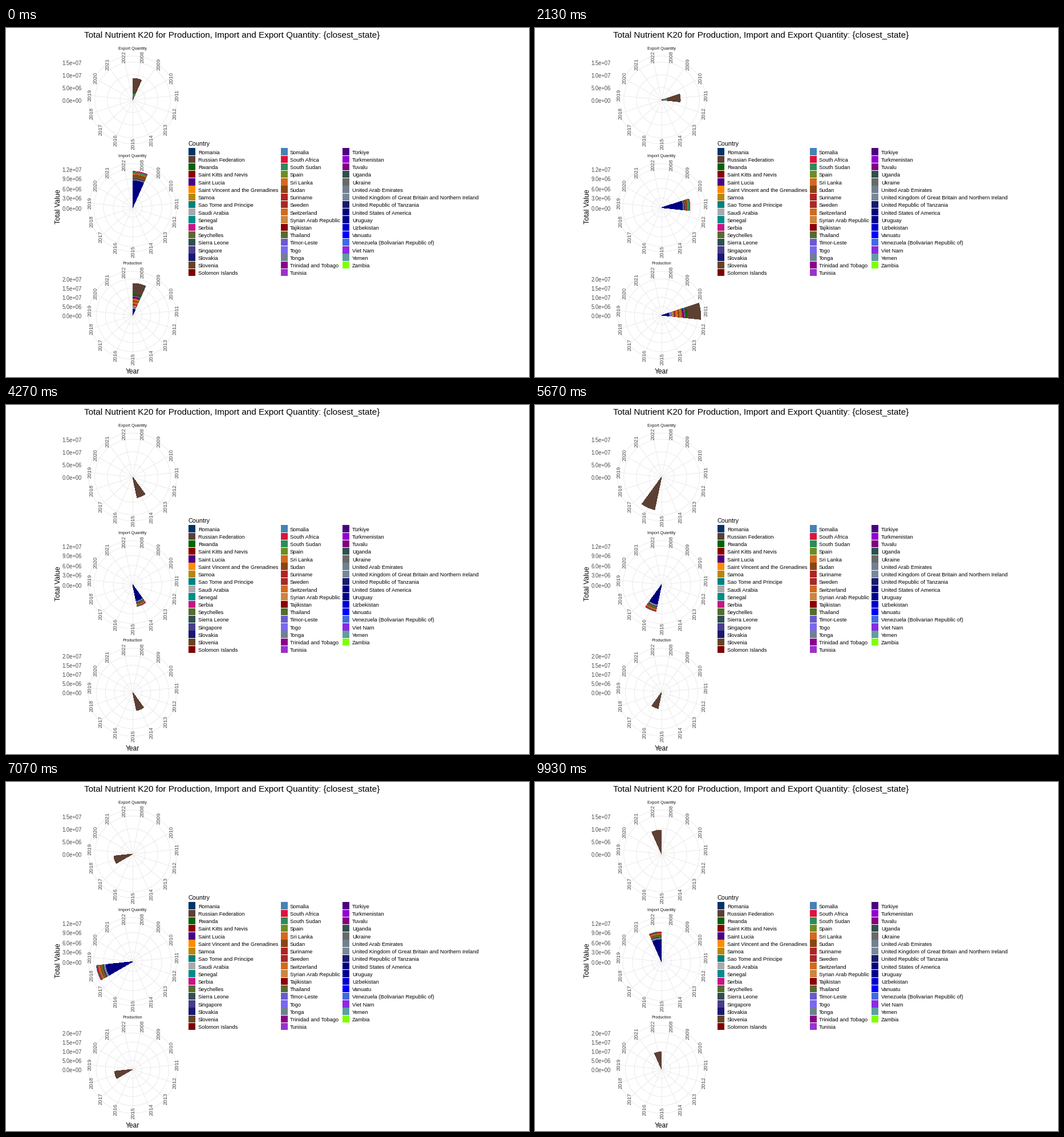
A matplotlib script that plays this animation: 917x611 px, repeating every 10000 ms.

```python
import matplotlib.pyplot as plt
import numpy as np
from matplotlib.animation import FuncAnimation
from matplotlib.patches import Circle, Rectangle, Wedge

W, H, DPI = 917, 611, 72  # at 72 dpi one point is one pixel
FRAMES, INTERVAL = 200, 50
TICKS = 150  # the years are spread evenly over this many ticks per loop
CX, RING = 222, 77
YEARS = range(2008, 2023)
STEP = 360 / len(YEARS)
GRID, GREY = "#ebebeb", "#4d4d4d"

plt.rcParams["font.family"] = "Liberation Sans"

COUNTRIES = {
    "Romania": "#003366", "Russian Federation": "#5c4033",
    "Rwanda": "#006400", "Saint Kitts and Nevis": "#8b0000",
    "Saint Lucia": "#4b0082", "Saint Vincent and the Grenadines": "#ff8c00",
    "Samoa": "#b8860b", "Sao Tome and Principe": "#008080",
    "Saudi Arabia": "#a9a9a9", "Senegal": "#008b8b", "Serbia": "#c71585",
    "Seychelles": "#556b2f", "Sierra Leone": "#2f4f4f",
    "Singapore": "#483d8b", "Slovakia": "#191970", "Slovenia": "#654321",
    "Solomon Islands": "#800000",
    "Somalia": "#4682b4", "South Africa": "#dc143c",
    "South Sudan": "#2e8b57", "Spain": "#6b8e23", "Sri Lanka": "#d2691e",
    "Sudan": "#8b4513", "Suriname": "#b22222", "Sweden": "#a52a2a",
    "Switzerland": "#d2691e", "Syrian Arab Republic": "#cd853f",
    "Tajikistan": "#8b0000", "Thailand": "#556b2f",
    "Timor-Leste": "#6a5acd", "Togo": "#7b68ee", "Tonga": "#708090",
    "Trinidad and Tobago": "#8b008b", "Tunisia": "#9932cc",
    "Türkiye": "#4b0082", "Turkmenistan": "#9400d3", "Tuvalu": "#800080",
    "Uganda": "#2f4f4f", "Ukraine": "#696969",
    "United Arab Emirates": "#708090",
    "United Kingdom of Great Britain and Northern Ireland": "#778899",
    "United Republic of Tanzania": "#191970",
    "United States of America": "#000080", "Uruguay": "#00008b",
    "Uzbekistan": "#0000cd", "Vanuatu": "#0000ff",
    "Venezuela (Bolivarian Republic of)": "#4169e1",
    "Viet Nam": "#8a2be2", "Yemen": "#5f9ea0", "Zambia": "#7fff00",
}
USA = "United States of America"
UK = "United Kingdom of Great Britain and Northern Ireland"
RUSSIA = {"Russian Federation": 1}

# Shares of each stack, from the centre outwards
EXPORT_MIX = {USA: 6, "Sweden": 4, "South Africa": 4, "Spain": 4,
              "South Sudan": 10, "Russian Federation": 72}
IMPORT_EARLY = {USA: 74, UK: 2, "Ukraine": 1.5, "Türkiye": 1.5,
                "Thailand": 3, "Sudan": 8, "Sri Lanka": 2,
                "South Sudan": 5, "South Africa": 1.5, "Serbia": 1.5}
IMPORT_LATE = {USA: 73.5, UK: 4, "Ukraine": 2, "Türkiye": 1.5,
               "Thailand": 5, "Sudan": 3, "Sri Lanka": 2, "Spain": 2.5,
               "South Africa": 3.5, "Slovenia": 1.5, "Somalia": 1.5}
PRODUCTION_MIX = {USA: 19, UK: 3, "Togo": 3, "Tonga": 2,
                  "Syrian Arab Republic": 3, "Sweden": 5, "Switzerland": 6,
                  "Sudan": 4, "Sri Lanka": 4, "Spain": 2,
                  "South Africa": 2, "Slovakia": 3, "Senegal": 2,
                  "Serbia": 2, "Rwanda": 5, "Russian Federation": 35}

# title, centre y, pixels per break, break labels, early and late mix, radii
PANELS = [
    ("Export Quantity", 126, 22.1,
     ["0.0e+00", "5.0e+06", "1.0e+07", "1.5e+07"], EXPORT_MIX, RUSSIA,
     [38, 23, 38, 33, 33, 34, 37, 53, 58.5, 68.4, 33, 33, 34.7, 43.8, 42]),
    ("Import Quantity", 314.5, 17,
     ["0.0e+00", "3.0e+06", "6.0e+06", "9.0e+06", "1.2e+07"],
     IMPORT_EARLY, IMPORT_LATE,
     [63.7, 34, 56, 50, 45, 50, 39, 50, 48, 54, 64, 59, 60.5, 68.4, 52.5]),
    ("Production", 503, 15.9,
     ["0.0e+00", "5.0e+06", "1.0e+07", "1.5e+07", "2.0e+07"],
     PRODUCTION_MIX, RUSSIA,
     [56, 35, 60.5, 68.4, 60.5, 36, 32.7, 31, 29, 34, 32, 33, 36.5, 36, 30.5]),
]

fig = plt.figure(figsize=(W / DPI, H / DPI), dpi=DPI, facecolor="white")
ax = fig.add_axes([0, 0, 1, 1])
ax.set(xlim=(0, W), ylim=(H, 0))
ax.axis("off")
bars = [[] for _ in YEARS]


def label(x, y, s, size, color="black", ha="left", rotation=0):
    ax.text(x, y, s, size=size, color=color, ha=ha, va="baseline",
            rotation=rotation, rotation_mode="anchor", zorder=5)


def draw_grid(cy, gap, breaks):
    for r in [gap * i for i in range(1, len(breaks))] + [RING]:
        ax.add_patch(Circle((CX, cy), r, fill=False, ec=GRID, lw=1))
    for i, year in enumerate(YEARS):
        a = np.radians((i + 0.5) * STEP)
        x, y = CX + RING * np.sin(a), cy - RING * np.cos(a)
        ax.plot([CX, x], [cy, y], color=GRID, lw=1, zorder=1)
        label(x + 3.8, y, year, 9.4, GREY, "center", 90)
    for i, s in enumerate(breaks):
        label(133, cy + 5 - gap * i, s, 9.5, GREY, "right")


def draw_bar(i, cy, radius, mix):
    """Stack one year's sectors, largest first so the inner ones cover it."""
    edges = radius * np.cumsum(list(mix.values())) / sum(mix.values())
    for name, r in reversed(list(zip(mix, edges))):
        sector = Wedge((CX, cy), r, i * STEP - 90, (i + 1) * STEP - 90,
                       fc=COUNTRIES[name], lw=0, antialiased=False, zorder=3)
        bars[i].append(ax.add_patch(sector))


def draw_legend():
    label(319.5, 205.5, "Country", 10.8)
    columns = [(320, 337), (481.5, 498), (590, 607)]
    for k, (name, color) in enumerate(COUNTRIES.items()):
        col, row = divmod(k, 17)
        key, text = columns[col]
        y = 216.5 + 13.22 * row
        ax.add_patch(Rectangle((key, y - 6.2), 12.4, 12.4, fc=color, lw=0,
                               antialiased=False))
        label(text, y + 4.3, name, 9.35)


label(137, 17, "Total Nutrient K20 for Production, Import and Export "
               "Quantity: {closest_state}", 15.2)
label(95, 313, "Total Value", 12.4, ha="center", rotation=90)
label(221.5, 605, "Year", 12, ha="center")
draw_legend()
for title, cy, gap, breaks, early, late, radii in PANELS:
    label(221.5, cy - 88.5, title, 7.2, "#1a1a1a", "center")
    draw_grid(cy, gap, breaks)
    for i, radius in enumerate(radii):
        draw_bar(i, cy, radius, early if i < 5 else late)

# First frame of each year, with its start rounded to a whole tick
last = len(YEARS) - 1
starts = [((TICKS - 1) * i + last // 2) // last * FRAMES // TICKS
          for i in range(len(YEARS))]


def update(frame):
    now = sum(frame >= s for s in starts) - 1
    for i, sectors in enumerate(bars):
        for s in sectors:
            s.set_visible(i == now)
    return [s for sectors in bars for s in sectors]


anim = FuncAnimation(fig, update, frames=FRAMES, interval=INTERVAL,
                     repeat=True, repeat_delay=0)
plt.show()
```
